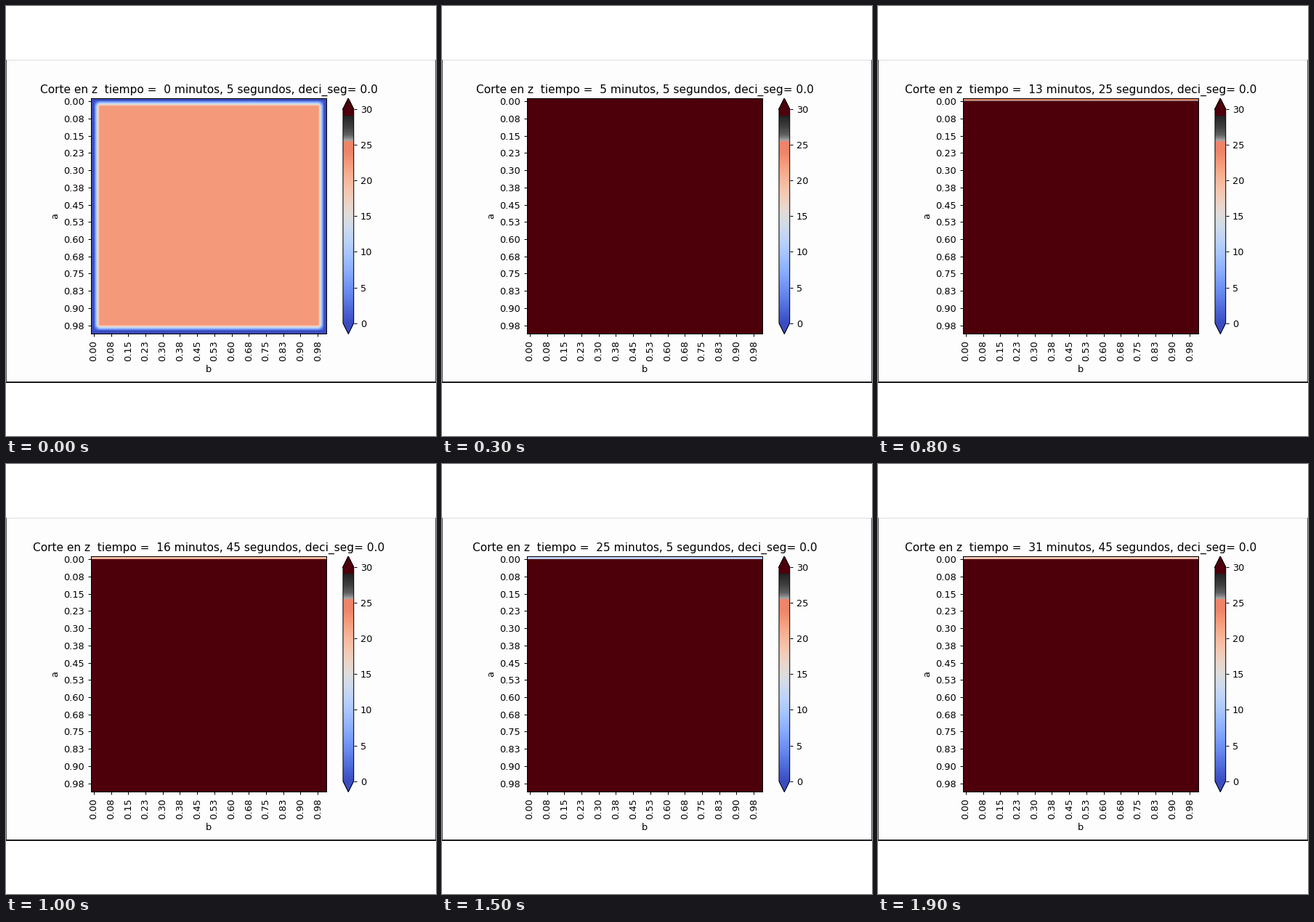
These frames come from a looping animation (592x592 px, 2 s). A matplotlib script:

```python
import numpy as np
import matplotlib.pyplot as plt
from matplotlib.animation import FuncAnimation
from matplotlib.colors import LinearSegmentedColormap, Normalize
from matplotlib.patches import Rectangle

SIZE, DPI = 592, 92.5
FRAMES, INTERVAL = 20, 100
CELLS = 41
VMAX = 30
HOT = 400

plt.rcParams["font.family"] = "DejaVu Sans"


def make_cmap():
    """Coolwarm up to 25.5 degrees, then a grey ramp, then maroon."""
    warm = plt.get_cmap("coolwarm")
    stops = [(v / VMAX, warm(v / VMAX)) for v in np.linspace(0, 24, 33)]
    stops += [
        (25.5 / VMAX, (0.933, 0.518, 0.412)),
        (25.5 / VMAX, (0.70, 0.69, 0.69)),
        (26.4 / VMAX, (0.38, 0.38, 0.38)),
        (27.5 / VMAX, (0.25, 0.25, 0.25)),
        (29.1 / VMAX, (0.13, 0.13, 0.13)),
        (29.1 / VMAX, (0.302, 0.0, 0.043)),
        (1, (0.302, 0.0, 0.043)),
    ]
    return LinearSegmentedColormap.from_list("heat", stops, N=512)


def box(x, y, w, h):
    """Pixel box measured from the top left, in figure fractions."""
    return [x / SIZE, 1 - (y + h) / SIZE, w / SIZE, h / SIZE]


def panel(x, y, w, h, color):
    l, b, w, h = box(x, y, w, h)
    fig.add_artist(Rectangle((l, b), w, h, transform=fig.transFigure,
                             fc=color, lw=0, zorder=-5, antialiased=False))


fig = plt.figure(figsize=(SIZE / DPI, SIZE / DPI), dpi=DPI, facecolor="white")
panel(0, 74, 592, 444, "#fdfdfd")
panel(0, 74, 592, 1, "#dcdcdc")
panel(0, 74, 1, 444, "#555555")
panel(591, 74, 1, 444, "#555555")
panel(0, 517, 592, 2, "#1a1a1a")

cmap, norm = make_cmap(), Normalize(0, VMAX)
ax = fig.add_axes(box(116.92, 127.3, 324.1, 324.1))
look = dict(cmap=cmap, norm=norm, aspect="auto")

cold = np.zeros((CELLS, CELLS))
cold[1:-1, 1:-1] = 22.4
hot = np.full((CELLS, CELLS), HOT)

heat = ax.imshow(cold, interpolation="bilinear", **look)
strip = ax.imshow(np.zeros((4, 1)), interpolation="nearest",
                  extent=(-0.5, CELLS - 0.5, 0.03, -0.5), **look)
ax.set_xlim(-0.5, CELLS - 0.5)
ax.set_ylim(CELLS - 0.5, -0.5)

ticks = np.arange(0, CELLS, 3)
labels = [f"{int(t * 2.5 + 0.5) / 100:.2f}" for t in ticks]
ax.set_xticks(ticks, labels, rotation=90)
ax.set_yticks(ticks, labels)
ax.set_xlabel("b")
ax.set_ylabel("a")
title = ax.set_title("")

cax = fig.add_axes(box(463.98, 127.3, 14.73, 324.1))
fig.colorbar(heat, cax=cax, extend="both", ticks=range(0, VMAX + 1, 5))

# Temperature at the upper and lower side of the exposed top edge.
KEYS = [1, 3, 6, 10, 12, 15, 19]
UPPER = [18, 31, 31, 15, 15, 12, 15]
LOWER = [25, 31, 31, 21, 15.5, 12, 19.5]


def update(i):
    minutes, seconds = divmod(5 + 100 * i, 60)
    title.set_text(f"Corte en z  tiempo =  {minutes} minutos, "
                   f"{seconds} segundos, deci_seg= 0.0")
    heat.set_data(hot if i else cold)
    strip.set_visible(i > 0)
    edge = np.linspace(np.interp(i, KEYS, UPPER), np.interp(i, KEYS, LOWER), 4)
    strip.set_data(edge[:, None])
    return heat, strip, title


anim = FuncAnimation(fig, update, frames=FRAMES, interval=INTERVAL,
                     init_func=lambda: update(0), repeat=True, repeat_delay=0)
plt.show()
```
